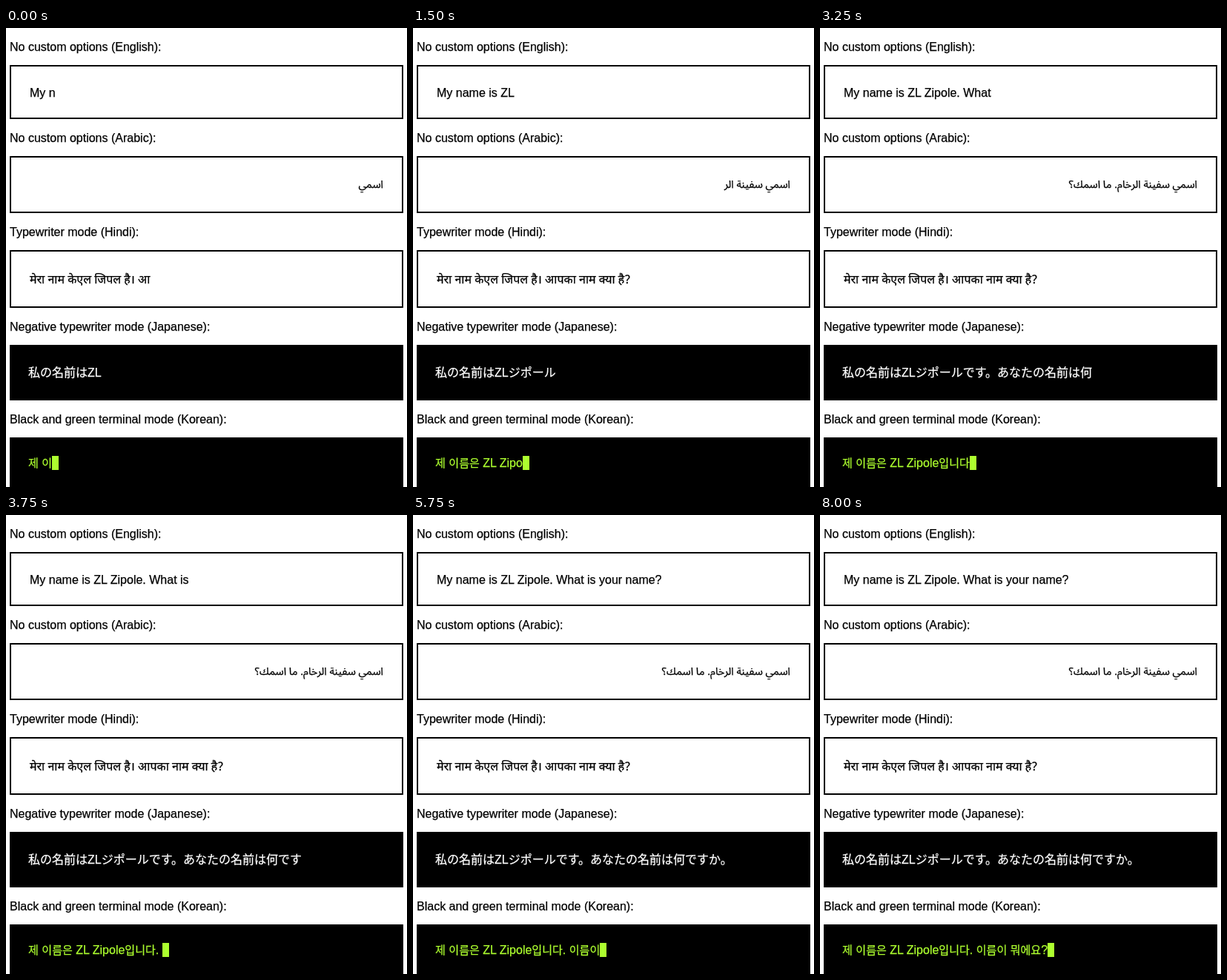
These frames come from a looping animation (541x620 px, 9.75 s). An HTML page:

```html
<!DOCTYPE html>
<html lang="en">
<head>
<meta charset="utf-8">
<title>Typing modes</title>
<style>
  html, body { margin: 0; width: 100%; height: 100%; overflow: hidden; background: #fff; }
  svg { display: block; width: 541px; height: 620px; }
  /* The hairline stroke gives the text a slightly fuller weight */
  text {
    font: 16px "Liberation Sans", Arial, sans-serif; white-space: pre;
    color: #000; fill: currentColor; stroke: currentColor; stroke-width: .25px;
  }
  .ar { font: 14.3px "Noto Sans Arabic", "DejaVu Sans", sans-serif; direction: rtl; }
  .hi { font-family: "Noto Sans Devanagari", "Noto Sans", sans-serif; }
  .ja { font-family: "Liberation Sans", "Noto Sans CJK JP", "Noto Sans CJK", sans-serif; color: #fff; }
  .ko { font-family: "Liberation Sans", "Noto Sans CJK KR", "Noto Sans CJK", sans-serif; color: #adff2f; }
  .hangul { font-size: .94em; }
</style>
</head>
<body>
<svg id="stage" viewBox="0 0 541 620"></svg>
<script>
const TICK = 250, LOOP = 9750;
const stage = document.getElementById('stage');

// keys: [tick, characters typed so far]
const rows = [
  { lang: 'en', label: 'No custom options (English):', top: 50, height: 73, x: 32, baseline: 93,
    text: 'My name is ZL Zipole. What is your name?',
    keys: [[0, 4], [5, 11], [6, 13], [10, 19], [13, 26], [18, 38], [20, 40]] },
  { lang: 'ar', label: 'No custom options (Arabic):', top: 173, height: 77, x: 509, baseline: 216,
    text: 'اسمي سفينة الرخام. ما اسمك؟',
    keys: [[0, 4], [5, 12], [6, 14], [10, 26], [13, 27]] },
  { lang: 'hi', label: 'Typewriter mode (Hindi):', top: 300, height: 78, x: 32, baseline: 345,
    text: 'मेरा नाम केएल जिपल है। आपका नाम क्या है?',
    keys: [[0, 24], [6, 40]] },
  { lang: 'ja', label: 'Negative typewriter mode (Japanese):', top: 428, height: 75, x: 30, baseline: 471, dark: true,
    text: '私の名前はZLジポールです。あなたの名前は何ですか。',
    keys: [[0, 7], [6, 11], [10, 17], [13, 22], [15, 24], [17, 26]] },
  { lang: 'ko', label: 'Black and green terminal mode (Korean):', top: 553, height: 67, x: 30, baseline: 593, dark: true,
    text: '제 이름은 ZL Zipole입니다. 이름이 뭐에요?',
    keys: [[0, 3], [6, 13], [10, 16], [13, 18], [15, 20], [18, 21], [20, 22], [23, 23],
           [26, 24], [27, 25], [30, 26], [31, 27], [32, 28]] }
];

// Fading backgrounds behind freshly typed Japanese characters
const glows = [
  { tick: 10, from: 14, to: 16, fill: '#202020' },
  { tick: 10, from: 16, to: 17, fill: '#484848' }
];

function add(tag, attrs, parent = stage) {
  const node = document.createElementNS('http://www.w3.org/2000/svg', tag);
  for (const name in attrs) node.setAttribute(name, attrs[name]);
  return parent.appendChild(node);
}

function typedCount(keys, tick) {
  const next = keys.findIndex(key => key[0] > tick);
  if (next < 0) return keys[keys.length - 1][1];
  const [t0, n0] = keys[next - 1], [t1, n1] = keys[next];
  return Math.floor(n0 + (n1 - n0) * (tick - t0) / (t1 - t0));
}

function setText(row, value) {
  if (row.lang !== 'ko') {
    row.node.textContent = value;
    return;
  }
  row.node.replaceChildren();
  for (const run of value.match(/[가-힣]+|[^가-힣]+/g)) {
    const span = add('tspan', /[가-힣]/.test(run) ? { class: 'hangul' } : {}, row.node);
    span.textContent = run;
  }
}

for (const row of rows) {
  add('text', { x: 5, y: row.top - 19 }).textContent = row.label;
  if (row.dark) {
    add('rect', { x: 5, y: row.top, width: 531, height: row.height });
  } else {
    add('rect', { x: 6, y: row.top + 1, width: 529, height: row.height - 2,
                  fill: 'none', stroke: '#000', 'stroke-width': 2 });
  }
  if (row.lang === 'ja') {
    for (const glow of glows) glow.node = add('rect', { y: 457, height: 17, fill: glow.fill });
  }
  row.node = add('text', { x: row.x, y: row.baseline, class: row.lang, lang: row.lang });
}
const [, , , japanese, korean] = rows;
const caret = add('rect', { y: 578, width: 9, height: 19, fill: '#adff2f' });

function render(tick) {
  for (const row of rows) setText(row, row.text.slice(0, typedCount(row.keys, tick)));
  caret.setAttribute('x', Math.round(korean.x + korean.node.getComputedTextLength()));
  for (const { node, tick: shown, from, to } of glows) {
    const visible = tick === shown;
    node.setAttribute('visibility', visible ? 'visible' : 'hidden');
    if (visible) {
      node.setAttribute('x', japanese.node.getStartPositionOfChar(from).x);
      node.setAttribute('width', japanese.node.getSubStringLength(from, to - from));
    }
  }
}

let lastTick = -1;
function frame() {
  const tick = Math.floor(performance.now() % LOOP / TICK);
  if (tick !== lastTick) render(lastTick = tick);
  requestAnimationFrame(frame);
}
frame();
</script>
</body>
</html>
```
